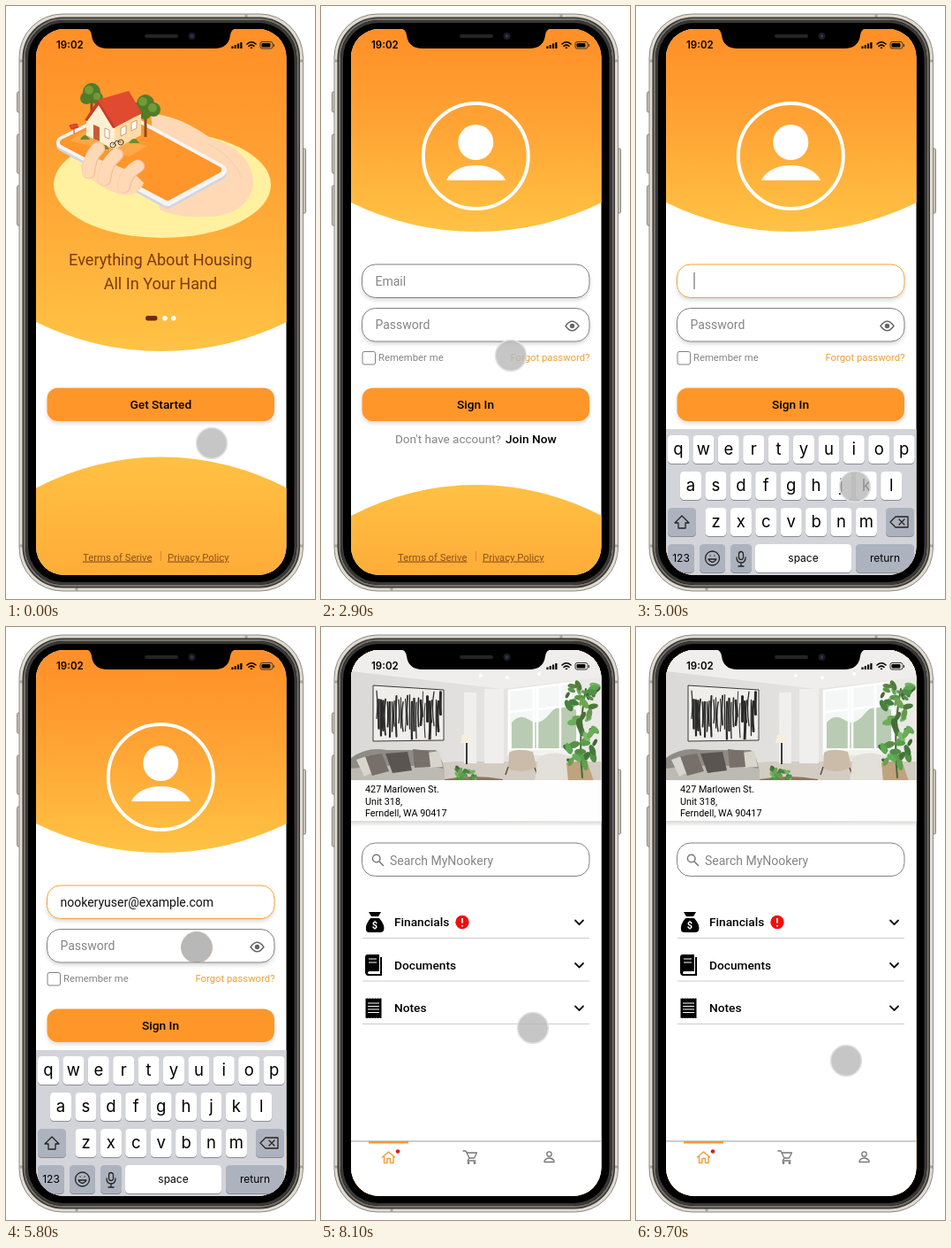
Animation of 350 by 670 pixels, one loop 9.9 s. Source, as an HTML page:

```html
<!DOCTYPE html>
<html lang="en">
<head>
<meta charset="utf-8">
<title>Housing app walkthrough</title>
<style>
  html, body { margin: 0; width: 100%; height: 100%; overflow: hidden; background: #fff; }
  svg { display: block; width: 350px; height: 670px; font-family: Roboto, sans-serif; }
  .bold { font-weight: 500; font-size: 13.7px; }
  .mid { text-anchor: middle; }
  .label { font-size: 14px; fill: #858585; }
  .small { font-size: 11.3px; fill: #858585; }
  .field { fill: #fff; stroke: #808080; stroke-width: 1; }
  .line { fill: none; stroke-linecap: round; stroke-linejoin: round; }
  .letter { font: 18.5px Inter, sans-serif; text-anchor: middle; }
  .cap { font: 12px Inter, sans-serif; text-anchor: middle; }
</style>
</head>
<body>
<svg viewBox="0 0 350 670">
  <defs>
    <linearGradient id="sun" x2="0" y2="1"><stop stop-color="#ff8e27"/><stop offset=".45" stop-color="#ffa234"/><stop offset="1" stop-color="#ffc344"/></linearGradient>
    <linearGradient id="dusk" x2="0" y2="1"><stop stop-color="#ffc143"/><stop offset="1" stop-color="#ffac38"/></linearGradient>
    <linearGradient id="wall" x2="1"><stop stop-color="#dad9d7"/><stop offset="1" stop-color="#eceae7"/></linearGradient>
    <clipPath id="screen"><rect x="34" y="26" width="283.5" height="617" rx="32"/></clipPath>
    <clipPath id="canvas"><path d="M60 67L138 72V127L60 128Z"/></clipPath>
    <filter id="shade" x="-10%" y="-20%" width="120%" height="160%"><feDropShadow dx="0" dy="2.5" stdDeviation="2" flood-opacity=".15"/></filter>
  </defs>

  <!-- Phone body -->
  <g fill="#c9c3b8" stroke="#77726a" stroke-width=".8">
    <rect x="12.5" y="97" width="4" height="23" rx="1.5"/><rect x="12.5" y="145" width="4" height="44" rx="1.5"/>
    <rect x="12.5" y="203" width="4" height="45" rx="1.5"/><rect x="335.5" y="161" width="4" height="73" rx="1.5"/>
    <rect x="15" y="9" width="321.5" height="652" rx="49" fill="#e0dbd1"/>
  </g>
  <path d="M15 62h5M331 62h5M15 610h5M331 610h5M80 656v5M272 9v5" stroke="#aaa59b" stroke-width="3"/>
  <rect x="18.5" y="12.5" width="314.5" height="645" rx="46" fill="#393734"/>
  <rect x="21" y="15" width="309.5" height="640" rx="44" stroke="#77736c" stroke-width="2"/>
  <rect x="23.5" y="17.5" width="304.5" height="635" rx="42" fill="none" stroke="#3a3937" stroke-width="3"/>

  <g clip-path="url(#screen)">
    <rect x="30" y="20" width="292" height="630" fill="#fff"/>
    <path id="top" fill="url(#sun)"/>
    <path id="bottom" fill="url(#dusk)"/>

    <g id="intro">
      <ellipse cx="177" cy="202" rx="123" ry="60" fill="#fff1a0"/>
      <path d="M164 122C192 123 218 139 234 151C262 155 282 181 280 201C278 222 258 238 229 238C207 239 192 238 174 230Z" fill="#ffd9b6"/>
      <path d="M228 155Q259 171 267 195" class="line" stroke="#f9cca8"/>
      <g stroke-linejoin="round">
        <path d="M64 157L127 126L243 189L183 222Z" fill="#d3d4dc" stroke="#d3d4dc" stroke-width="14"/>
        <path d="M64 154L127 123L243 186L183 219Z" fill="#f4f4f6" stroke="#f4f4f6" stroke-width="14"/>
        <path d="M65 154L127 124L240 185L183 216Z" fill="#ff962c" stroke="#ff962c" stroke-width="8"/>
      </g>
      <path d="M72 152l18-11 70 17-20 12Z" fill="#ffa849"/>
      <path d="M97 136V104M158 148V112" stroke="#8d4b1d" stroke-width="3"/>
      <g fill="#527c28">
        <circle cx="97" cy="97" r="10"/><circle cx="91" cy="104" r="7"/><circle cx="103" cy="104" r="7"/>
        <circle cx="158" cy="110" r="10"/><circle cx="149" cy="117" r="8"/><circle cx="167" cy="117" r="8"/><circle cx="157" cy="120" r="8"/>
      </g>
      <g fill="#719b38"><circle cx="94" cy="95" r="5"/><circle cx="103" cy="102" r="4"/><circle cx="155" cy="108" r="5"/><circle cx="166" cy="115" r="5"/></g>
      <path d="M91 128L104 111L123 133V162L91 146Z" fill="#fff0d4"/>
      <path d="M123 135L153 122V146L123 162Z" fill="#ffdca6"/>
      <path d="M104 106L139 96L154 121L122 138Z" fill="#df4a30"/>
      <path d="M104 106L89 129L92 130L105 112L121 138L124 137Z" fill="#c63d2a"/>
      <path d="M99 134l7 3v16l-7-3Z" fill="#c75b35"/>
      <path d="M112 138l5 2v10l-5-2ZM130 138l6-3v9l-6 3ZM142 132l6-3v9l-6 3Z" fill="#fff" stroke="#c08a58" stroke-width=".8"/>
      <path d="M77 144v-7M72 135l8-2 2 4-8 2Z" stroke="#c43825" fill="#e44934"/>
      <path d="M84 151q5-10 11 0ZM106 162q5-10 11 0ZM139 155q6-10 12 0Z" fill="#6c8b32"/>
      <g class="line" stroke="#5d3f32"><circle cx="121" cy="157" r="3"/><circle cx="130" cy="154" r="3"/><path d="M121 157l4-5 5 2"/></g>
      <path d="M84 180Q98 204 130 213Q150 216 156 200L144 188L124 180L102 172Z" fill="#ffd9b6"/>
      <g class="line">
        <path id="fingers" d="M94 188Q95 170 105 161M112 196Q113 178 126 168M134 204Q135 190 150 181" stroke="#f2c29c" stroke-width="14.5"/>
        <use href="#fingers" x="-.8" style="stroke:#ffd9b6"/>
        <path d="M93 188Q94 170 104 161M111 196Q112 178 125 168M133 204Q134 190 149 181" stroke="#ffd9b6" stroke-width="13.5"/>
      </g>
      <g class="mid" font-size="18.1" fill="#7b390b"><text x="175" y="293">Everything About Housing</text><text x="175" y="320">All In Your Hand</text></g>
      <rect x="158" y="350" width="13.5" height="5.5" rx="2.7" fill="#70290b"/>
      <circle cx="180" cy="352.7" r="2.8" fill="#fff"/><circle cx="189.7" cy="352.7" r="2.8" fill="#fff"/>
    </g>

    <g id="sign">
      <circle cx="175.3" cy="169.5" r="59.5" fill="none" stroke="#fff" stroke-width="4"/>
      <path d="M142 197C147 186 160 180 175.5 180S204 186 209 197Z" fill="#fff"/>
      <circle cx="175.3" cy="154" r="20" fill="#fff"/>
      <g filter="url(#shade)">
        <rect id="emailBox" class="field" x="46.5" y="292" width="257.5" height="37.5" rx="15"/>
        <rect id="passBox" class="field" x="46.5" y="341.5" width="257.5" height="37.5" rx="15"/>
      </g>
      <text id="email" class="label" x="61.5" y="316"></text>
      <path id="caret" d="M66 301v19" stroke="#555"/>
      <text id="passHint" class="label" x="61.5" y="365">Password</text>
      <g id="dots"></g>
      <path d="M277 361.5Q284.5 351 292 361.5Q284.5 372 277 361.5Z" class="line" stroke="#666" stroke-width="1.4"/>
      <circle cx="284.5" cy="361.5" r="2.7" fill="#666"/>
      <rect x="47" y="390.5" width="14.5" height="14.5" rx="2" class="field"/>
      <text class="small" x="65" y="401">Remember me</text>
      <text class="small" x="304.5" y="401" text-anchor="end" style="fill:#eda02f">Forgot password?</text>
      <text x="84" y="494" font-size="13.5" fill="#858585">Don't have account?</text>
      <text x="209" y="494" class="bold">Join Now</text>
    </g>

    <rect x="46.5" y="431.5" width="257.5" height="37.5" rx="12" fill="#ff962c" filter="url(#shade)"/>
    <text id="start" class="bold mid" x="175.3" y="455">Get Started</text>
    <text id="signIn" class="bold mid" x="175" y="455">Sign In</text>
    <g class="small" style="fill:#90501a" text-decoration="underline"><text x="87" y="626.5">Terms of Serive</text><text x="183" y="626.5">Privacy Policy</text></g>
    <path d="M175.5 616v11" stroke="#d58b35"/>

    <g id="keys"><rect x="30" y="478" width="292" height="180" fill="#d2d4da"/></g>

    <g id="home">
      <rect x="30" y="20" width="292" height="630" fill="#fff"/>
      <rect x="30" y="20" width="292" height="200" fill="url(#wall)" filter="url(#shade)"/>
      <path d="M30 20H322V56L205 70L34 50Z" fill="#efeeec"/>
      <path d="M34 166L150 152H320V174H34Z" fill="#d3ccc3"/>
      <path d="M162 74h14v80h-14ZM185 70h22v84h-22Z" fill="#f0efed"/>
      <path d="M213 72L292 62V139H213Z" fill="#f5f7f6"/>
      <path d="M216 108Q225 97 236 105T259 98T289 94V137H216Z" fill="#b9cbb2"/>
      <path d="M213 72L292 62V139H213ZM241 69v70M245 69v70M271 65v74M213 96l79-8" fill="none" stroke="#fff" stroke-width="2.5"/>
      <path d="M211 139h84v6h-84Z" fill="#f4f2ef"/>
      <path d="M59 66L139 71V128L59 129Z" fill="#efeeeb" stroke="#3a3a3a"/>
      <g id="paint" clip-path="url(#canvas)" stroke="#2a2a2a" class="line"></g>
      <path d="M34 148Q52 135 74 139H130Q140 150 140 173H34Z" fill="#8f8b86"/>
      <path d="M34 160Q90 153 140 160V174H34Z" fill="#bdb9b3"/>
      <path d="M40 150l14-5 9 17-14 7ZM121 142l13-2 4 18-15 1Z" fill="#d9d5cd"/>
      <path d="M50 146l19-3 8 20-19 5ZM104 138l18 2 2 18-18 1Z" fill="#77706a"/>
      <path d="M73 143l25-2 5 21-22 3Z" fill="#5a5551"/>
      <path d="M160 122h10l2 9h-14Z" fill="#f7eedc"/><path d="M165 131v24" stroke="#3d3a36" stroke-width="2"/>
      <path d="M213 142Q222 136 240 141L244 158Q229 167 212 160Z" fill="#cbbba9"/>
      <path d="M212 158l-3 9M242 159l3 8" stroke="#62503c" stroke-width="1.5"/>
      <path d="M246 148Q261 138 282 146L286 174H242Z" fill="#e3dfd9"/><path d="M278 153l23-2 8 23h-29Z" fill="#bfa27e"/>
      <path d="M140 172q33-6 66 0v3h-66Z" fill="#8c7661"/>
      <path d="M296 170Q291 116 300 70" class="line" stroke="#426b32" stroke-width="2"/>
      <g id="plant"></g>
      <g fill="#fff"><circle cx="181" cy="55" r="2"/><circle cx="211" cy="57" r="2"/><circle cx="247" cy="53" r="2"/></g>
      <rect x="34" y="173" width="284" height="46" fill="#fff" fill-opacity=".96"/>
      <g font-size="10.8"><text x="50" y="187">427 Marlowen St.</text><text x="50" y="200.5">Unit 318,</text><text x="50" y="214">Ferndell, WA 90417</text></g>
      <rect class="field" x="46.5" y="244" width="257.5" height="37.5" rx="15"/>
      <path d="M66 265l4.5 4.5M67 261.500a4.300 4.300 0 1 1-8.600 0a4.300 4.300 0 1 1 8.600 0" class="line" stroke="#777" stroke-width="1.5"/>
      <text class="label" x="78" y="268.5">Search MyNookery</text>
      <g class="bold"><text x="83" y="338">Financials</text><text x="83" y="386.5">Documents</text><text x="83" y="435">Notes</text></g>
      <path d="M47 351.5H304M47 400H304M47 448.5H304" stroke="#ccc"/>
      <path d="M288 331.5l4.5 4.5 4.5-4.5M288 380l4.5 4.5 4.5-4.5M288 428.5l4.5 4.5 4.5-4.5" class="line" stroke="#111" stroke-width="1.8"/>
      <circle cx="160" cy="333.5" r="7.7" fill="#f20d0d"/><path d="M160 329v5.5M160 337v1.5" stroke="#fff" stroke-width="1.8"/>
      <path d="M54 322h14l-3 5h-8ZM56 329h10Q73 337 71 343Q70 345 67 345H55Q51 345 51 342Q50 336 56 329Z"/>
      <text x="61" y="341" class="mid" font-size="11" font-weight="700" fill="#fff">$</text>
      <path d="M53 370h13v19H54q-2 2 0 3H67V373h2v21H53q-3-1-3-4V373q0-3 3-3Z"/>
      <path d="M54 375h9M54 379h9" stroke="#fff"/>
      <rect x="50.5" y="419.5" width="18" height="22.5"/>
      <path d="M50.5 419.5h18M50.5 442h18" stroke="#fff" stroke-dasharray="1 2"/>
      <path d="M53 425h13M53 428.5h13M53 432h13M53 435.5h13" stroke="#fff"/>
      <path d="M30 581H322" stroke="#b8bbc0" stroke-width="1.5"/><rect x="54" y="581" width="45" height="2.5" fill="#ff962c"/>
      <path d="M69.5 599l7-6 7 6M71.5 598v7.5h3.5v-5h3.500v5h3.500V598" class="line" stroke="#f4a03b" stroke-width="1.5"/>
      <circle cx="87" cy="592.5" r="2.3" fill="#df1a12"/>
      <g class="line" stroke="#777" stroke-width="1.3"><path d="M161 592h3l4 8h5.500l3-6h-11M168 600l-2 3h9"/><circle cx="167" cy="605.5" r=".8"/><circle cx="174" cy="605.5" r=".8"/><circle cx="258.5" cy="595.5" r="2.7"/><path d="M253 604.500v-1.500q2-3 5.500-3t5.500 3v1.500Z"/></g>
    </g>

    <text x="57" y="48" font-size="11.5" font-weight="600" font-family="Inter, sans-serif">19:02</text>
    <path d="M256.5 48v-2.5M259.8 48v-4M263.1 48v-5.5M266.4 48v-7" stroke="#000" stroke-width="2.2"/>
    <path d="M273 43q5-4.500 10 0M275 45.300q3-2.500 6 0M277.500 47.300h1" class="line" stroke="#000" stroke-width="1.6"/>
    <rect x="288" y="40.5" width="14" height="7.5" rx="2" fill="none" stroke="#333"/><rect x="289.5" y="42" width="10" height="4.5" rx="1"/><path d="M303.5 43v3" stroke="#333"/>
  </g>

  <path d="M90 25Q96 26 97 33Q99 48 115 48H236Q252 48 254 33Q255 26 261 25Z"/>
  <rect x="157" y="32" width="38" height="4" rx="2" fill="#242424"/>
  <circle cx="210.5" cy="34" r="4" fill="#1a1c28"/><circle cx="210.5" cy="34" r="1.7" fill="#30374d"/>

  <g id="cursor">
    <circle id="idle" r="17.5" fill="#b8b8b8" fill-opacity=".8" stroke="#e2e2e2" stroke-width="1.5"/>
    <circle id="press" r="17.5" fill="#787878" fill-opacity=".52" stroke="#c4b7a7" stroke-width="1"/>
  </g>
</svg>
<script>
const LOOP = 9900;
const el = id => document.getElementById(id);
const add = (id, markup) => el(id).insertAdjacentHTML('beforeend', markup);

let seed = 7;
const random = () => (seed = seed * 16807 % 2147483647) / 2147483647;

function drawKey(x, y, width, content, dark) {
  add('keys', `<rect x="${x}" y="${y + 1}" width="${width}" height="32" rx="4.5" fill="#898c91"/>
    <rect x="${x}" y="${y}" width="${width}" height="32" rx="4.5" fill="${dark ? '#adb3be' : '#fff'}"/>${content}`);
}

function drawKeyboard() {
  [['qwertyuiop', 48, 485], ['asdfghjkl', 62, 526], ['zxcvbnm', 90.5, 567]].forEach(([row, x0, y]) => {
    [...row].forEach((letter, i) => {
      const x = x0 + i * 28.4;
      drawKey(x - 12, y, 24, `<text class="letter" x="${x}" y="${y + 22}">${letter}</text>`);
    });
  });
  const icon = d => `<path d="${d}" class="line" stroke="#222" stroke-width="1.3"/>`;
  const cap = (x, text) => `<text class="cap" x="${x}" y="628">${text}</text>`;
  drawKey(36, 567, 32, icon('M52 576l-8 8h4v6h8v-6h4Z'), true);
  drawKey(283, 567, 32, icon('M288 583l6-6h14v12h-14ZM298 580l6 6M304 580l-6 6'), true);
  drawKey(36, 608, 30, cap(51, '123'), true);
  drawKey(72, 608, 29, icon('M94.5 624a8 8 0 1 1-16 0a8 8 0 1 1 16 0M82 625q4.5 7 9 0ZM84 621h.1M89 621h.1'), true);
  drawKey(107, 608, 24, icon('M116.5 619a2.5 2.5 0 0 1 5 0v4a2.5 2.5 0 0 1-5 0ZM114 623q0 6 5 6t5-6M119 629v4M116 633h6'), true);
  drawKey(135, 608, 109, cap(189.5, 'space'));
  drawKey(249, 608, 66, cap(282, 'return'), true);
}

function drawDetails() {
  for (let i = 0; i < 11; i++) add('dots', `<circle cx="${64.5 + i * 8.5}" cy="360" r="3.2"/>`);
  for (let i = 0; i < 30; i++) {
    const x = 63 + i * 2.5, y = 72 + random() * 14;
    add('paint', `<path d="M${x} ${y}q${random() * 5 - 3} 17 0 ${25 + random() * 22}" stroke-width="${.7 + random() * 2.5}"/>`);
  }
  const leaf = (x, y, size) => add('plant', `<ellipse cx="${x}" cy="${y}" rx="${size}" ry="${size * .5}"
    transform="rotate(${random() * 160 - 80} ${x} ${y})" fill="hsl(${95 + random() * 20} 34% ${30 + random() * 28}%)"/>`);
  for (let i = 0; i < 50; i++) leaf(278 + random() * 34, 64 + random() * 95, 3.5 + random() * 4);
  for (let i = 0; i < 18; i++) leaf(154 + random() * 22, 160 + random() * 12, 4);
}

function ramp(t, start, end) {
  const p = Math.max(0, Math.min(1, (t - start) / (end - start)));
  return p * p * (3 - 2 * p);
}

// Pointer stops: time, x, y
const stops = [
  [0, 233, 494], [500, 233, 494], [1200, 244, 450], [1700, 244, 450], [2900, 215, 395],
  [3300, 205, 313], [3800, 205, 313], [4700, 248, 543], [5300, 248, 543], [5800, 216, 362],
  [6300, 216, 362], [6900, 248, 490], [7050, 248, 490], [7450, 240, 453], [8200, 240, 453],
  [9000, 238, 490], [LOOP, 238, 490]
];
const taps = [1300, 3400, 5150, 5900, 7500];

function pointerAt(t) {
  const i = stops.findIndex(stop => stop[0] > t);
  const [t0, x0, y0] = stops[i - 1], [t1, x1, y1] = stops[i];
  const p = ramp(t, t0, t1);
  return [x0 + (x1 - x0) * p, y0 + (y1 - y0) * p];
}

const fade = (id, value) => el(id).setAttribute('opacity', value);
const show = (id, visible) => fade(id, visible ? 1 : 0);

function render(t) {
  const signIn = ramp(t, 1600, 2100);
  const topEdge = 390 - 135 * signIn, bottomEdge = 509.5 + 31.5 * signIn;
  el('top').setAttribute('d', `M34 24H318V${topEdge - 33}A322 322 0 0 1 34 ${topEdge - 33}Z`);
  el('bottom').setAttribute('d', `M34 645H318V${bottomEdge + 35}A306 306 0 0 0 34 ${bottomEdge + 35}Z`);
  fade('intro', 1 - signIn);
  fade('start', 1 - signIn);
  fade('sign', signIn);
  fade('signIn', signIn);
  fade('home', ramp(t, 7550, 7850));

  const keyboard = ramp(t, 3500, 3800) - ramp(t, 6400, 6700);
  el('keys').setAttribute('transform', `translate(0 ${175 * (1 - keyboard)})`);

  const focused = t >= 3500, filled = t >= 5250, passFocused = t >= 5950;
  el('email').textContent = filled ? 'nookeryuser@example.com' : focused ? '' : 'Email';
  el('email').style.fill = filled ? '#111' : '';
  el('emailBox').style.stroke = focused ? '#f0a33a' : '';
  el('passBox').style.stroke = passFocused ? '#f0a33a' : '';
  show('caret', focused && !filled && Math.floor(t / 500) % 2 === 0);
  show('passHint', !passFocused);
  show('dots', t >= 6200);

  const pressed = taps.some(tap => Math.abs(t - tap) < 120);
  show('idle', !pressed);
  show('press', pressed);
  el('cursor').setAttribute('transform', `translate(${pointerAt(t)})`);
}

function tick() {
  render(performance.now() % LOOP);
  requestAnimationFrame(tick);
}

drawKeyboard();
drawDetails();
tick();
</script>
</body>
</html>
```
